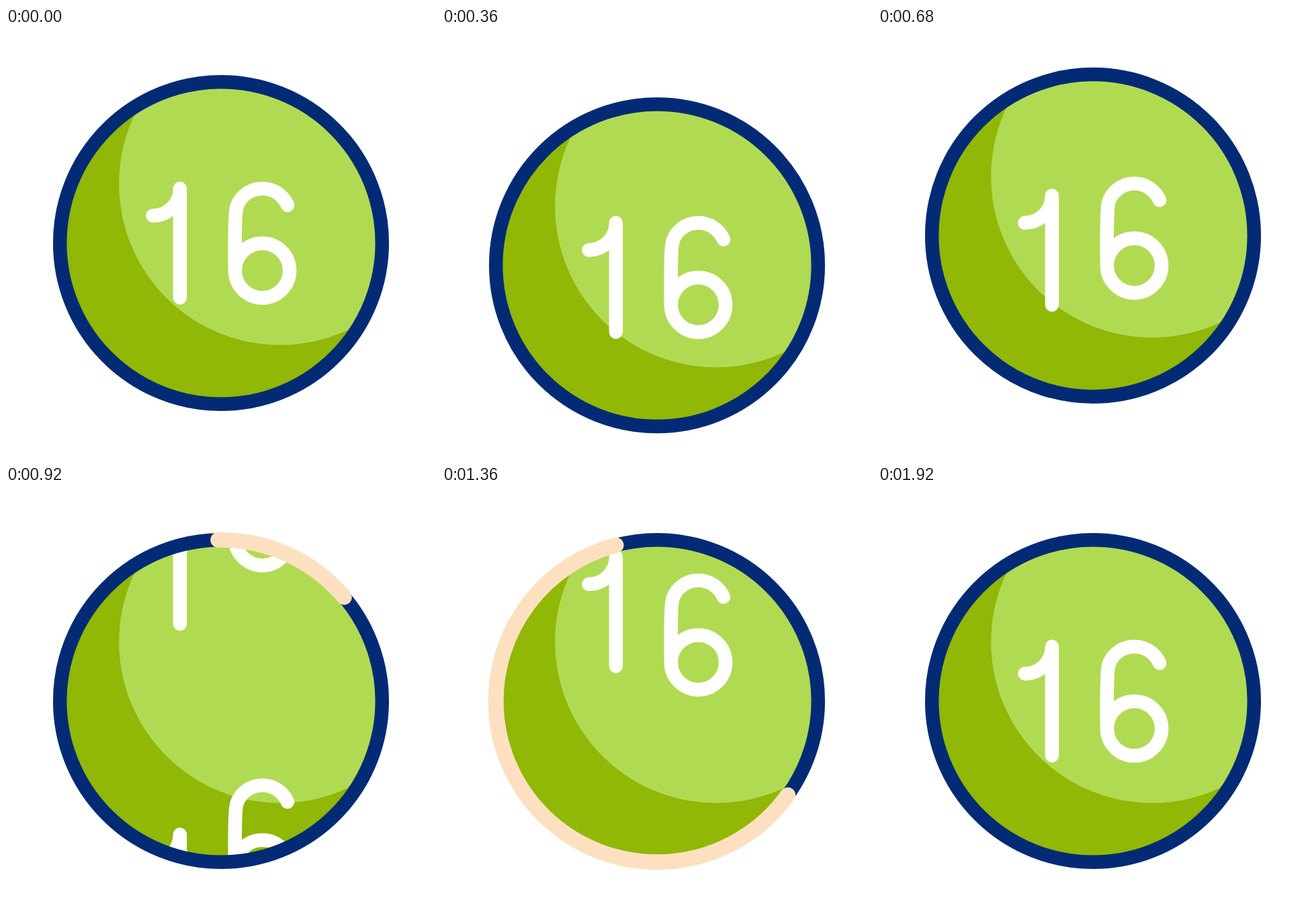
Animation, 640 px wide and 640 px high, one loop 2000 ms. Source, as an HTML page:

```html
<!DOCTYPE html>
<html lang="en">
<head>
<meta charset="utf-8">
<title>Number badge</title>
<style>
  html, body { margin: 0; width: 100%; height: 100%; overflow: hidden; background: #fff; }
  svg { display: block; width: 100%; height: 100%; }
  .line { fill: none; stroke-width: 20.48; stroke-linecap: round; stroke-linejoin: round; }
  .digit { stroke: #fff; }
  .ring { stroke: #032b75; }
  .tracer { stroke: #fde0bf; stroke-width: 23; }
</style>
</head>
<body>
<svg viewBox="0 0 640 640">
  <defs>
    <clipPath id="disc"><circle cx="320" cy="320" r="239.8"/></clipPath>
    <path id="one" class="line digit" d="M218.5 279.3A40.4 40.4 0 0 0 258.9 238.9V401.3"/>
    <path id="six" class="line digit" d="M419 263.6C412.6 249 398.5 239 381.6 239C361 239 344 254 342.2 273C340.5 290 340.4 318 340.9 361A40.6 40.6 0 1 0 422.1 361A40.6 40.6 0 1 0 340.9 361"/>
  </defs>
  <g id="badge">
    <g clip-path="url(#disc)">
      <circle cx="320" cy="320" r="239.8" fill="#91b707"/>
      <circle cx="408" cy="232" r="239.8" fill="#b1da53"/>
      <use id="oneOut" href="#one"/>
      <use id="oneIn" href="#one"/>
      <use id="sixOut" href="#six"/>
      <use id="sixIn" href="#six"/>
    </g>
    <circle class="line ring" cx="320" cy="320" r="239.8"/>
    <circle id="tracer" class="line tracer" cx="320" cy="320" r="239.8" pathLength="360" transform="rotate(-91 320 320)"/>
  </g>
</svg>
<script>
  const LOOP = 2000, STEP = 40;
  const byId = id => document.getElementById(id);

  // Vertical offsets as [time, value] keys, eased between neighbours
  const tracks = {
    badge: [[120, 0], [360, 33.3], [560, -31.5], [760, 0]],
    oneOut: [[120, 0], [600, 35.6], [620, 35.6], [1140, -341.5]],
    sixOut: [[120, 0], [600, 35.6], [1080, -395]],
    oneIn: [[800, 345.5], [1320, -141], [1600, 0]],
    sixIn: [[760, 329.2], [1240, -144], [1560, 0]]
  };
  const head = [[759, 0], [1440, 360]];
  const tail = [[1040, 0], [1840, 360]];

  const smooth = x => x * x * (3 - 2 * x);

  function valueAt(keys, t) {
    if (t <= keys[0][0]) return keys[0][1];
    for (let i = 1; i < keys.length; i++) {
      const [t0, v0] = keys[i - 1], [t1, v1] = keys[i];
      if (t < t1) return v0 + (v1 - v0) * smooth((t - t0) / (t1 - t0));
    }
    return keys[keys.length - 1][1];
  }

  function render(t) {
    for (const id in tracks) {
      byId(id).setAttribute("transform", `translate(0 ${valueAt(tracks[id], t).toFixed(2)})`);
    }
    const start = valueAt(tail, t), length = valueAt(head, t) - start;
    const tracer = byId("tracer");
    tracer.setAttribute("visibility", length > 0.1 ? "visible" : "hidden");
    tracer.setAttribute("stroke-dasharray", `${length} 720`);
    tracer.setAttribute("stroke-dashoffset", -start);
  }

  const origin = performance.now();
  function tick() {
    const t = (performance.now() - origin) % LOOP;
    render(Math.floor(t / STEP) * STEP);
    requestAnimationFrame(tick);
  }
  tick();
</script>
</body>
</html>
```
